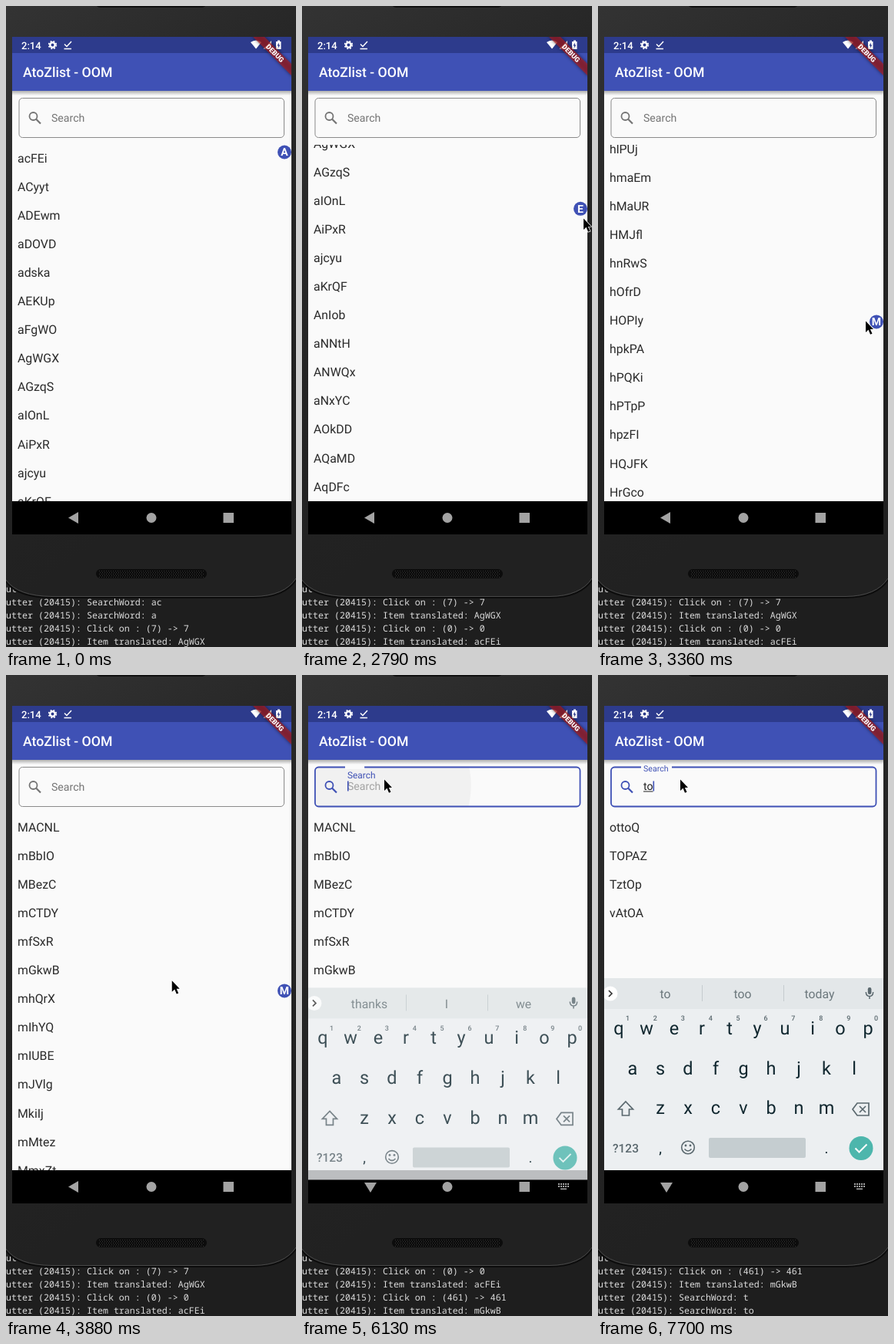
Recreate the animation shown at these times as an HTML page with a canvas. Size 377 by 831 pixels, loop 8000 ms.

```html
<!DOCTYPE html>
<html lang="en">
<head>
<meta charset="utf-8">
<title>A to Z list</title>
<style>
html, body { margin: 0; width: 100%; height: 100%; overflow: hidden; background: #1e1e1e }
canvas { display: block }
</style>
</head>
<body>
<canvas id="c" width="377" height="831"></canvas>
<script>
const g = document.getElementById('c').getContext('2d');
g.textRendering = 'geometricPrecision';
const LOOP = 8000, ROW = 37.09, PER = 38, BOTTOM = 642;
const INDIGO = '#3f51b5', KEY = '#10272f', SOFT = '#5a686e';

// Moments at which the screen refreshes: [first, last, count]
const ticks = [[0, 0, 1], [300, 890, 10], [1250, 1830, 10], [1900, 2020, 2], [2090, 2790, 10], [2850, 2850, 1],
  [2920, 3360, 8], [3430, 3690, 5], [3740, 4210, 8], [4750, 4750, 1], [5440, 5440, 1], [5490, 5700, 4],
  [6020, 6020, 1], [6070, 6070, 1], [6130, 6270, 3], [6520, 6520, 1], [7000, 7000, 1], [7450, 7700, 5]]
  .flatMap(([a, b, n]) => Array.from({ length: n }, (_, i) => n > 1 ? Math.round(a + (b - a) * i / (n - 1)) : a));

// Keyframes: [time, ...values]
const pointer = [[300, 242, 815], [560, 70, 420], [760, 25, 225], [890, 45, 199], [1440, 45, 199], [1830, 41, 543],
  [1900, 130, 500], [2020, 334, 300], [2090, 352, 235], [2320, 362, 190], [2500, 362, 192], [2790, 366, 275],
  [3230, 364, 408], [3360, 348, 408], [3690, 318, 404], [3740, 291, 402], [4210, 27, 380],
  [5400, 27, 380], [5440, 62, 277], [5700, 107, 135]];
const scrolling = [[2650, 0], [2730, 1.5], [2790, 7.515], [2850, 30], [3360, 283.326], [3600, 410], [3690, 448], [3740, 456]];
const lettering = [[2500, 0], [2790, 4], [3260, 12]];

const log = ['SearchWord: acf', 'SearchWord: ac', 'SearchWord: a', 'Click on : (7) -> 7', 'Item translated: AgWGX',
  'Click on : (0) -> 0', 'Item translated: acFEi', 'Click on : (461) -> 461', 'Item translated: mGkwB',
  'SearchWord: t', 'SearchWord: to'];

const words = s => s.split(' ');
const rnd = n => { const v = Math.sin(n * 12.9898) * 43758.5453; return v - Math.floor(v); };
const names = Array.from({ length: 26 * PER }, (_, i) => {
  const code = [i / PER, i % PER * 26 / PER, rnd(i) * 26, rnd(i + .3) * 26, rnd(i + .6) * 26];
  return code.map((c, k) => String.fromCharCode((rnd(i * 7 + k) < .5 ? 65 : 97) + Math.floor(c))).join('');
});
const put = (at, s) => words(s).forEach((w, i) => names[at + i] = w);
put(0, 'acFEi ACyyt ADEwm aDOVD adska AEKUp aFgWO AgWGX AGzqS aIOnL AiPxR ajcyu aKrQF AnIob aNNtH ANWQx aNxYC AOkDD AQaMD AqDFc');
put(283, 'hlPUj hmaEm hMaUR HMJfl hnRwS hOfrD HOPIy hpkPA hPQKi hPTpP hpzFI HQJFK HrGco');
put(456, 'MACNL mBbIO MBezC mCTDY mfSxR mGkwB mhQrX mIhYQ mIUBE mJVlg MkiIj mMtez MmxZt');
const found = { t: names.filter(n => /t/i.test(n)).slice(0, 20), to: words('ottoQ TOPAZ TztOp vAtOA') };

function track(keys, t) {
  let i = 0;
  while (i < keys.length - 2 && t > keys[i + 1][0]) i++;
  const [a, b] = [keys[i], keys[i + 1]];
  const p = Math.min(1, Math.max(0, (t - a[0]) / (b[0] - a[0])));
  return a.slice(1).map((v, k) => v + (b[k + 1] - v) * p);
}
function box(x, y, w, h, color) { g.fillStyle = color; g.fillRect(x, y, w, h); }
function fill(d, color) { g.fillStyle = color; g.fill(new Path2D(d)); }
function line(d, color, w = 1) { g.strokeStyle = color; g.lineWidth = w; g.stroke(new Path2D(d)); }
function round(x, y, w, h, r) { g.beginPath(); g.roundRect(x, y, w, h, r); }
function disc(x, y, r, color) { g.beginPath(); g.arc(x, y, r, 0, 7); g.fillStyle = color; g.fill(); }
function ring(x, y, r, color, w) { g.beginPath(); g.arc(x, y, r, 0, 7); g.strokeStyle = color; g.lineWidth = w; g.stroke(); }
// y is the middle of the capital letters
function text(s, x, y, size, color, align = 'left', weight = 400) {
  g.font = `${weight} ${size}px Roboto, sans-serif`;
  g.textAlign = align;
  g.fillStyle = color;
  g.fillText(s, x, y + .355 * size);
}
function clipped(x, y, w, h, draw) {
  g.save();
  g.beginPath();
  g.rect(x, y, w, h);
  g.clip();
  draw();
  g.restore();
}

function drawConsole(t) {
  box(0, 700, 377, 131, '#1e1e1e');
  const last = t >= 7637 ? 11 : t >= 7450 ? 10 : t >= 4750 ? 9 : t >= 1250 ? 7 : 5;
  g.font = '500 11.67px "Noto Sans Mono", monospace';
  g.textAlign = 'left';
  g.fillStyle = '#dcdcdc';
  log.slice(last - 5, last).forEach((s, i) => g.fillText('utter (20415): ' + s, 0, 760 + 17 * i));
}

function drawPhone() {
  const body = g.createLinearGradient(0, 0, 377, 500);
  body.addColorStop(0, '#333');
  body.addColorStop(.4, '#272727');
  body.addColorStop(1, '#212121');
  const edge = 'M0 746Q15 767 60 767H322Q362 767 377 744';
  fill(edge + 'V0H0Z', body);
  line(edge, '#0c0c0c', 2);
  line('M0 744Q15 765 60 765.5H322Q362 765 377 742', '#484848');
  round(117, -8, 143, 10, 5); g.fillStyle = '#111'; g.fill();
  round(117, 730, 144, 12, 6); g.fillStyle = '#0c0c0c'; g.fill();
  g.setLineDash([1, 2]);
  for (let y = 732; y < 742; y += 2) line(`M${121 + y % 4 / 2} ${y}.5H257`, '#333');
  g.setLineDash([]);
}

function drawBars() {
  box(8, 40, 363, 21, '#2d3b8c');
  text('2:14', 20, 51, 13, '#fff', 'left', 500);
  ring(60.5, 50.5, 3.2, '#fff', 2.4);
  g.setLineDash([2, 1.9]);
  ring(60.5, 50.5, 4.9, '#fff', 1.6);
  g.setLineDash([]);
  line('M76 49.5L79 52.5L85 46M75.5 55.5H85', '#fff', 1.5);
  fill('M325 55.5L318 47Q325 42 332 47Z', '#fff');
  fill('M345 45V55.5H334.5Z', '#fff');
  fill('M351 46H353V44.5H356V46H357.5V56H351Z', '#fff');
  fill('M354.8 47.5L352.5 51.5H354V54.5L356.3 50.5H354.8Z', '#2d3b8c');

  const shade = g.createLinearGradient(0, 110, 0, 116);
  shade.addColorStop(0, 'rgba(0,0,0,.3)');
  shade.addColorStop(1, 'rgba(0,0,0,0)');
  box(8, 110, 363, 6, shade);
  box(8, 61, 363, 49, INDIGO);
  text('AtoZlist - OOM', 22, 86, 17.66, '#fff', 'left', 500);

  clipped(8, 40, 363, 100, () => {
    g.translate(371, 40);
    g.rotate(Math.PI / 4);
    g.filter = 'blur(2px)';
    box(-36, 24.7, 72, 10.6, 'rgba(0,0,0,.5)');
    g.filter = 'none';
    box(-36, 24.7, 72, 10.6, 'rgba(183,28,28,.63)');
    text('DEBUG', 0, 30, 9, '#fff', 'center', 900);
  });
}

function drawField(t, p, typed) {
  const focus = t >= 6020, color = focus ? INDIGO : '#757575';
  if (focus && t < 6270) clipped(18, 120, 343, 50, () => disc(107, 143, 27 + (t - 6020) * .78, '#f1f1f1'));
  round(17, 119.5, 344.5, 51, 4.5);
  g.strokeStyle = focus ? INDIGO : '#8a8a8a';
  g.lineWidth = focus ? 1.8 : 1;
  g.stroke();
  if (p > 0) box(56, 117, 40 * p, 5, '#fafafa');
  ring(35.5, 143, 5, color, 1.8);
  line('M39 146.5L45 152.5', color, 2.2);
  text('Search', 59, 145 - 24 * p, 14.1 - 3.5 * p, color);
  if (p > 0 && !typed) {
    g.globalAlpha = p;
    text('Search', 59, 144, 14.1, '#757575');
    g.globalAlpha = 1;
  }
  let end = 59;
  if (typed) {
    text(typed, 59, 144, 14.1, '#222');
    end += g.measureText(typed).width;
    box(59, 150.5, end - 59, 1, '#222');
  }
  if (focus && !(t >= 6520 && t < 7000)) box(end, 137.5, 1.6, 13, INDIGO);
}

function drawList(t, typed, bottom) {
  const items = found[typed] || names;
  const top = typed ? 0 : track(scrolling, t)[0];
  clipped(8, 180, 363, bottom - 180, () => {
    for (let i = Math.max(0, Math.floor(top) - 1); i < Math.min(items.length, top + 14); i++)
      text(items[i], 15, 197 + ROW * (i - top), 15.88, '#2a2a2a');
    if (t >= 6020) return;
    const n = Math.round(track(lettering, t)[0]), y = 189.5 + 18.33 * n;
    disc(362, y, 9, INDIGO);
    text(String.fromCharCode(65 + n), 362, y, 14, '#fff', 'center', 700);
  });
}

function drawNav(open) {
  box(8, BOTTOM, 363, 43, '#000');
  const gray = '#a3a3a3';
  fill(open ? 'M81 658H97L89 671Z' : 'M94 656V671L81 663.5Z', gray);
  disc(189, 663.5, 6.5, gray);
  box(282.5, 657, 13.5, 13, gray);
  if (!open) return;
  g.setLineDash([2, 1]);
  line('M333 660H347M333 663H347', gray, 2);
  g.setLineDash([]);
  box(336, 665.5, 8, 1.6, gray);
}

function drawKeyboard(p, typed) {
  g.save();
  g.beginPath();
  g.rect(8, 380, 363, 305);
  g.clip();
  g.translate(0, 90 * (1 - p) ** 2);
  g.globalAlpha = .45 + .55 * p;
  box(8, 393, 363, BOTTOM - 393, '#eceff1');
  box(8, 393, 363, 40, '#e3e7e9');
  disc(16, 413, 9.5, '#fff');
  line('M14 409L18 413L14 417', '#333', 1.7);
  box(135, 402, 1, 21, '#c5cbce');
  box(241, 402, 1, 21, '#c5cbce');
  const hints = { t: 't the to', to: 'to too today' }[typed] || 'thanks I we';
  words(hints).forEach((w, i) => text(w, [87.5, 188, 288][i], 413.5, 15.8, '#6b777c', 'center'));
  round(350.8, 405, 4.6, 9, 2.3); g.fillStyle = SOFT; g.fill();
  line('M348.3 411Q348.5 416.5 353 416.5T357.7 411M353 416.5V420', SOFT, 1.5);

  [['qwertyuiop', 27], ['asdfghjkl', 45], ['zxcvbnm', 81]].forEach(([row, x], r) =>
    [...row].forEach((ch, i) => text(ch, x + 36 * i, 457.5 + 51.7 * r, 23.5, KEY, 'center')));
  [...'1234567890'].forEach((d, i) => text(d, 38.5 + 35.9 * i, 445, 9, SOFT, 'center', 500));

  line('M36 553L45.5 563H40.5V571H31.5V563H26.5Z', SOFT, 1.7);
  line('M337 555H352V571H337L331 563ZM340 559L348 567M348 559L340 567', SOFT, 1.7);
  text('?123', 36, 613, 15.5, SOFT, 'center', 500);
  text(',', 81, 613, 19, KEY, 'center');
  text('.', 297, 613, 19, KEY, 'center');
  ring(117, 612.5, 8.3, SOFT, 1.6);
  disc(114, 610, 1.4, SOFT);
  disc(120, 610, 1.4, SOFT);
  line('M112.5 614.5Q117 619.5 121.5 614.5', SOFT, 1.6);
  round(144, 600, 126, 26, 2); g.fillStyle = '#c5cdd0'; g.fill();
  disc(342, 613.5, 15.5, '#4db6ac');
  line('M334.5 613.5L339.5 618.5L349.5 608.5', '#fff', 2);
  g.restore();
}

function drawPointer(t) {
  if (t < 300) return;
  const [x, y] = track(pointer, t);
  g.save();
  g.translate(x - .5, y);
  const arrow = 'M.5 .5V15L4 11.8L6.5 17.8L9 16.8L6.4 10.9H10.5Z';
  line(arrow, '#fff', 1.4);
  fill(arrow, '#000');
  g.restore();
}

function draw(now) {
  const at = now % LOOP;
  const t = ticks.findLast(k => k <= at);
  const p = Math.min(1, Math.max(0, (t - 6020) / 175));
  const typed = t >= 7637 ? 'to' : t >= 7450 ? 't' : '';
  drawConsole(t);
  drawPhone();
  box(8, 110, 363, BOTTOM - 110, '#fafafa');
  drawList(t, typed, p > 0 ? 393 : BOTTOM);
  drawField(t, p, typed);
  drawBars();
  drawNav(p > 0);
  if (p > 0) drawKeyboard(p, typed);
  drawPointer(t);
}

const start = performance.now();
function loop() {
  draw(performance.now() - start);
  requestAnimationFrame(loop);
}
loop();
</script>
</body>
</html>
```
